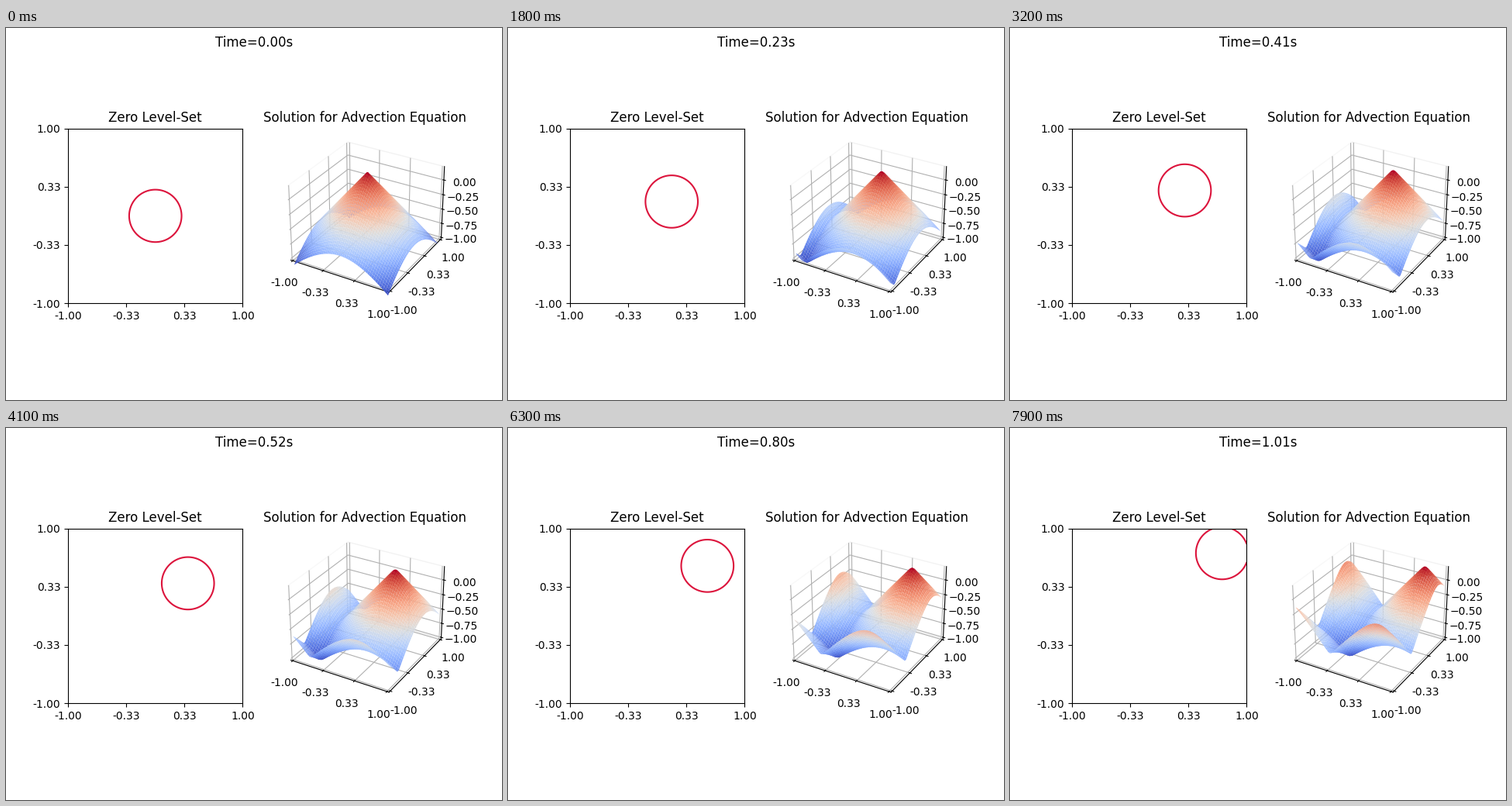
Write a matplotlib script that moves like this. It is 640x480 px and loops after 8000 ms.

```python
import matplotlib.pyplot as plt
import numpy as np
from matplotlib.animation import FuncAnimation
from mpl_toolkits.mplot3d.art3d import Poly3DCollection

N = 100            # grid points per axis
FRAMES = 80
CFL = 0.45         # cells travelled per step along each axis
DT = 0.9 * 0.02 / np.sqrt(2)
RADIUS = 0.3

axis = np.linspace(-1, 1, N)
X, Y = np.meshgrid(axis, axis)


def upwind(f, ax):
    """Left-biased WENO5 difference on a periodic grid, per cell."""
    d = f - np.roll(f, 1, ax)
    a, b, c, e, g = (np.roll(d, k, ax) for k in (2, 1, 0, -1, -2))
    s1 = 13 / 12 * (a - 2 * b + c) ** 2 + (a - 4 * b + 3 * c) ** 2 / 4
    s2 = 13 / 12 * (b - 2 * c + e) ** 2 + (b - e) ** 2 / 4
    s3 = 13 / 12 * (c - 2 * e + g) ** 2 + (3 * c - 4 * e + g) ** 2 / 4
    eps = 1e-6 * np.max(d ** 2)
    w1, w2, w3 = 0.1 / (s1 + eps) ** 2, 0.6 / (s2 + eps) ** 2, 0.3 / (s3 + eps) ** 2
    p1 = (2 * a - 7 * b + 11 * c) / 6
    p2 = (-b + 5 * c + 2 * e) / 6
    p3 = (2 * c + 5 * e - g) / 6
    return (w1 * p1 + w2 * p2 + w3 * p3) / (w1 + w2 + w3)


def euler(f):
    return f - CFL * (upwind(f, 0) + upwind(f, 1))


def advance(f):
    """One third-order TVD Runge-Kutta step."""
    half = 0.75 * f + 0.25 * euler(euler(f))
    return f / 3 + 2 / 3 * euler(half)


fields = [RADIUS - np.hypot(X, Y)]
for _ in range(FRAMES - 1):
    fields.append(advance(fields[-1]))

# Perimeter of each 2x2 block of cells, as row and column indices
start = np.arange(0, N - 1, 2)
row0, col0 = (m.reshape(-1, 1) for m in np.meshgrid(start, start, indexing="ij"))
rows = np.minimum(row0 + np.array([0, 0, 0, 1, 2, 2, 2, 1]), N - 1)
cols = np.minimum(col0 + np.array([0, 1, 2, 2, 2, 1, 0, 0]), N - 1)


def patches(f):
    return np.stack([X[rows, cols], Y[rows, cols], f[rows, cols]], axis=-1)


fig = plt.figure(figsize=(6.4, 4.8), dpi=100)
clock = fig.suptitle("Time=0.00s")
ticks = np.linspace(-1, 1, 4)
names = [f"{t:.2f}" for t in ticks]

flat = fig.add_subplot(121)
flat.set_title("Zero Level-Set")
flat.set_aspect("equal")

solid = fig.add_subplot(122, projection="3d")
solid.set_title("Solution for Advection Equation")
surface = Poly3DCollection(patches(fields[0]), cmap="coolwarm")
solid.add_collection3d(surface)

for ax in (flat, solid):
    ax.set_xticks(ticks, names)
    ax.set_yticks(ticks, names)
flat.set(xlim=(-1, 1), ylim=(-1, 1))
edge = 1 + 1 / 24
solid.set(xlim=(-edge, edge), ylim=(-edge, edge), zlim=(-1.025, 0.225))
for side in (solid.xaxis, solid.yaxis, solid.zaxis):
    side.pane.fill = False

ring = []


def draw(i):
    f = fields[i]
    clock.set_text(f"Time={i * DT:.2f}s")
    while ring:
        ring.pop().remove()
    ring.append(flat.contour(X, Y, f, levels=[0], colors="crimson"))
    verts = patches(f)
    surface.set_verts(verts)
    surface.set_array(verts[..., 2].mean(axis=1))
    surface.autoscale()
    return clock, surface


anim = FuncAnimation(fig, draw, frames=FRAMES, interval=100, repeat=True,
                     repeat_delay=0, blit=False)
plt.show()
```
